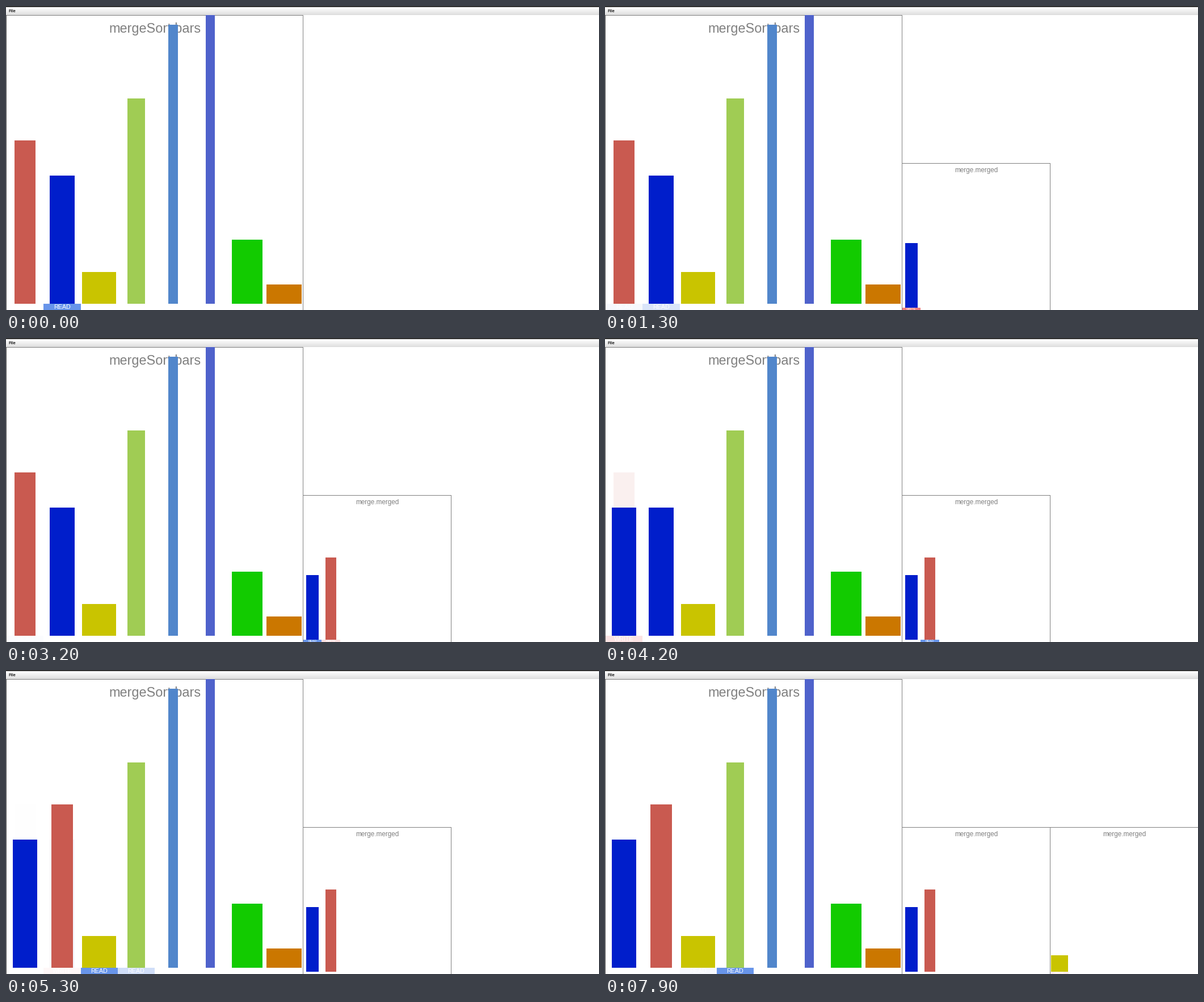
Write a matplotlib script that moves like this. It is 1045x536 px and loops after 8000 ms.

```python
import math

import matplotlib.pyplot as plt
from matplotlib.animation import FuncAnimation
from matplotlib.patches import Rectangle

W, H, DPI = 1045, 536, 100
FRAMES, STEP = 80, 100
GRAY = "#808080"
LABELS = {"READ": "#6895ea", "WRITE": "#f08080"}

# name: (width, height, colour)
BARS = {
    "red": (37.5, 288.5, "#c95a50"),
    "blue": (43.5, 226.5, "#001ecb"),
    "yellow": (60, 56.5, "#c9c400"),
    "lime": (30.5, 362, "#a0cc54"),
    "sky": (17.5, 492, "#5186cb"),
    "indigo": (16.5, 509, "#4f62cb"),
    "green": (54.5, 113, "#12cb00"),
    "orange": (62, 34, "#cb7700"),
}

# panel: (left, top, scale, floor, title, time it opens)
PANELS = {
    "main": (1, 16, 1, 525, "mergeSort.bars", -1),
    "left": (523.5, 277, 0.5, 531.5, "merge.merged", 900),
    "right": (784.7, 277, 0.5, 531.5, "merge.merged", 7100),
}

# (time, kind, panel, slot, bar written)
OPS = [
    (-250, "READ", "main", 1, None),
    (300, "READ", "main", 0, None),
    (600, "READ", "main", 1, None),
    (900, "WRITE", "left", 0, "blue"),
    (2000, "READ", "main", 0, None),
    (2500, "WRITE", "left", 1, "red"),
    (3000, "READ", "left", 0, None),
    (3480, "WRITE", "main", 0, "blue"),
    (3900, "READ", "left", 1, None),
    (4300, "WRITE", "main", 1, "red"),
    (4650, "READ", "main", 3, None),
    (5100, "READ", "main", 2, None),
    (6100, "READ", "main", 2, None),
    (6400, "READ", "main", 3, None),
    (6900, "READ", "main", 2, None),
    (7100, "WRITE", "right", 0, "yellow"),
    (7500, "READ", "main", 3, None),
]
SLOT = 65.25
HOLD, LABEL_FADE, BAR_FADE = 400, 210, 300

fig = plt.figure(figsize=(W / DPI, H / DPI), dpi=DPI, facecolor="white")
ax = fig.add_axes([0, 0, 1, 1])
ax.set_xlim(0, W)
ax.set_ylim(H, 0)
ax.axis("off")


def rect(x, y, w, h, color, z=1):
    return ax.add_patch(Rectangle((x, y), w, h, facecolor=color, linewidth=0, zorder=z))


def text(x, y, s, px, color, z, **kw):
    return ax.text(x, y, s, fontsize=px * 72 / DPI, color=color, zorder=z,
                   family="Liberation Sans", **kw)


def make_bar(panel, slot, name, z=4):
    left, _, k, floor, _, _ = PANELS[panel]
    w, h, color = BARS[name]
    mid = left + (slot + 0.5) * SLOT * k
    return rect(mid - w * k / 2, floor - h * k, w * k, h * k, color, z)


def make_label(panel, slot):
    left, _, k, floor, _, _ = PANELS[panel]
    x = left + slot * SLOT * k
    box = rect(x, floor, SLOT * k, 25 * k, "white", 6)
    word = text(x + SLOT * k / 2, floor + 9.5 * k, "", 10.7 * k, "white", 7,
                ha="center", va="baseline")
    return box, word


def make_panel(name):
    left, top, k, _, title, _ = PANELS[name]
    size = 522.5 * k
    parts = [
        rect(math.floor(left), top, size, 1, GRAY, 2),
        rect(math.floor(left + size), top, 1, H - top, GRAY, 2),
        text(left + size / 2, top + 31 * k + (0 if k == 1 else 0.5), title,
             23.5 * k, GRAY, 3, ha="center", va="baseline"),
    ]
    return parts


def menu_bar():
    for row in range(14):
        shade = 1 - 0.13 * row / 13
        rect(0, 2 + row, W, 1, (shade,) * 3)
    rect(0, 0, W, 2, "#2f2f2f")
    text(4.5, 10.6, "File", 7.4, "#222222", 3, weight="bold", va="baseline")


menu_bar()
rect(0, 16, 1, H - 16, "#555555", 2)
panels = {name: make_panel(name) for name in PANELS}
start = [make_bar("main", i, name) for i, name in enumerate(BARS)]
labels = {op[2:4]: make_label(*op[2:4]) for op in OPS}
writes = [(t, panel, slot, make_bar(panel, slot, bar, 5))
          for t, kind, panel, slot, bar in OPS if bar]


def label_alpha(age):
    return math.exp(-max(0, age - HOLD) / LABEL_FADE)


def update(i):
    now = i * STEP
    for name, parts in panels.items():
        for part in parts:
            part.set_visible(now >= PANELS[name][5])

    for t, panel, slot, bar in writes:
        age = now - t
        bar.set_alpha(min(1, max(0, age / 250)))
        if panel == "main":
            start[slot].set_alpha(math.exp(-max(0, age) / BAR_FADE))

    for key, (box, word) in labels.items():
        past = [op for op in OPS if op[2:4] == key and op[0] <= now]
        box.set_visible(bool(past))
        word.set_visible(bool(past))
        if past:
            t, kind = past[-1][:2]
            box.set_facecolor(LABELS[kind])
            box.set_alpha(label_alpha(now - t))
            word.set_text(kind)
    return []


anim = FuncAnimation(fig, update, frames=FRAMES, interval=STEP,
                     init_func=lambda: update(0), repeat=True, repeat_delay=0)
plt.show()
```
